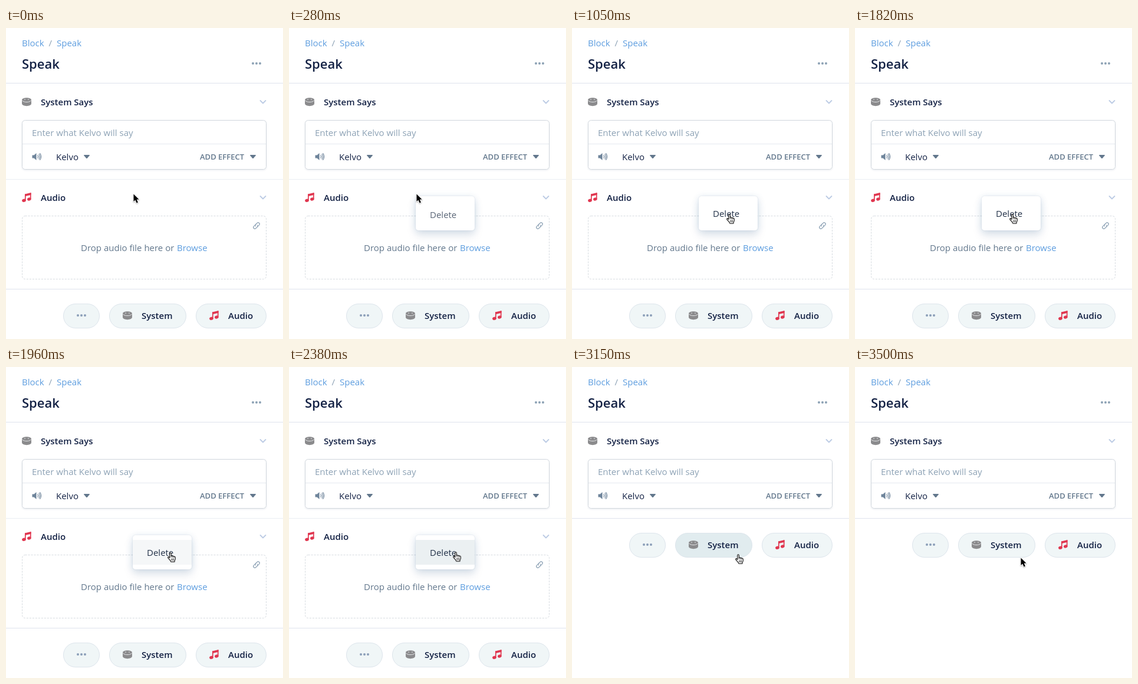
Animation of 470 by 527 pixels, one loop 3780 ms. Source, as an HTML page with a canvas:

```html
<!DOCTYPE html>
<html lang="en">
<head>
<meta charset="utf-8">
<title>Speak block</title>
<style>
html, body { margin: 0; width: 100%; height: 100%; overflow: hidden; background: #fff; }
canvas { display: block; width: 470px; height: 527px; }
</style>
</head>
<body>
<canvas id="stage" width="470" height="527"></canvas>
<script>
const ctx = document.getElementById('stage').getContext('2d');
const LOOP = 3780, STEP = 70;
const INK = '#132144', SLATE = '#62778c', MUTED = '#8da2b5', BLUE = '#5d9ddf', LINE = '#dfe3ed', RED = '#e0364f';

// time, x, y of the pointer tip
const PATH = [
  [490, 216, 281], [560, 222, 287], [630, 231, 296], [700, 241, 305], [770, 250, 310],
  [840, 257, 313], [910, 262, 314], [980, 265, 315], [1050, 268, 315],
  [1820, 268, 315], [1890, 274, 315], [1960, 280, 314], [2030, 284, 313],
  [3080, 284, 313], [3150, 283, 317], [3220, 282, 321], [3290, 281, 323]
];

const clamp = v => Math.max(0, Math.min(1, v));
const ramp = (t, a, b) => clamp((t - a) / (b - a));

function pointerAt(t) {
  let i = 0;
  while (i < PATH.length - 1 && PATH[i + 1][0] <= t) i++;
  const [t0, x0, y0] = PATH[i], [t1, x1, y1] = PATH[i + 1] || [t0 + 1, x0, y0];
  const k = ramp(t, t0, t1);
  return [x0 + (x1 - x0) * k, y0 + (y1 - y0) * k];
}

function text(str, x, y, color, weight = 400, size = 15) {
  ctx.font = `${weight} ${size}px "Open Sans", "Noto Sans", sans-serif`;
  ctx.fillStyle = color;
  ctx.fillText(str, x, y);
}

function rule(y, color = LINE) {
  ctx.fillStyle = color;
  ctx.fillRect(0, y, 470, 1);
}

function box(x, y, w, h, r) {
  ctx.beginPath();
  ctx.roundRect(x, y, w, h, r);
}

function path(d, color, width) {
  const p = new Path2D(d);
  if (width) {
    ctx.strokeStyle = color;
    ctx.lineWidth = width;
    ctx.stroke(p);
  } else {
    ctx.fillStyle = color;
    ctx.fill(p);
  }
}

function at(x, y, draw) {
  ctx.save();
  ctx.translate(x, y);
  ctx.lineCap = ctx.lineJoin = 'round';
  draw();
  ctx.restore();
}

function dots(x, y, color = MUTED) {
  ctx.fillStyle = color;
  for (const dx of [-6, 0, 6]) {
    ctx.beginPath();
    ctx.arc(x + dx, y, 2, 0, 7);
    ctx.fill();
  }
}

const disc = (x, y) => at(x, y, () => {
  path('M-8 -3C-8 -8 8 -8 8 -3V3C8 8.5 -8 8.5 -8 3Z', '#8b8b8d');
  path('M-7.6 -2.2C-6 1.6 6 1.6 7.6 -2.2', '#e4e6e8', 1);
  path('M-3.5 -3.8H-2.5M2.5 -3.8H3.5', '#d5d7d9', 1.2);
});

const note = (x, y) => at(x, y, () => {
  path('M-3 -5.6L7.5 -8V-4.2L-3 -1.8Z', RED);
  path('M-2.2 -5V5M6.7 -7V2.6', RED, 1.7);
  ctx.fillStyle = RED;
  for (const [dx, dy] of [[-4.6, 5.3], [4.3, 3]]) {
    ctx.beginPath();
    ctx.ellipse(dx, dy, 3.3, 2.6, -0.2, 0, 7);
    ctx.fill();
  }
});

const chevron = y => at(436, y, () => path('M-4.5 -2L0 2.5L4.5 -2', '#bccbe4', 1.8));

const caret = (x, y) => at(x, y, () =>
  path('M-4 -3H4Q5.6 -3 4.6 -1.8L1 2.4Q0 3.5 -1 2.4L-4.6 -1.8Q-5.6 -3 -4 -3Z', SLATE));

const speaker = (x, y) => at(x, y, () => {
  path('M-7.5 -2.5H-4.5L-0.5 -6V6L-4.5 2.5H-7.5Z', '#6e849a');
  path('M2 -2.2Q3.6 0 2 2.2M4 -4Q7 0 4 4M5.6 -5.4Q9.6 0 5.6 5.4', '#6e849a', 1.2);
});

const link = (x, y) => at(x, y, () => {
  ctx.rotate(-Math.PI / 4);
  path('M1.2 -2.4H-4A2.4 2.4 0 0 0 -4 2.4H-0.5A2.4 2.4 0 0 0 1.8 0.4', MUTED, 1.2);
  path('M-1.2 2.4M-1.8 -0.4A2.4 2.4 0 0 1 0.5 -2.4H4A2.4 2.4 0 0 1 4 2.4H-0.6', MUTED, 1.2);
});

function pill(x, y, w, hover = 0) {
  const mix = (a, b) => Math.round(a + (b - a) * hover);
  box(x + 0.5, y + 0.5, w - 1, 41, 20.5);
  ctx.fillStyle = `rgb(${mix(240, 225)},${mix(246, 236)},${mix(247, 239)})`;
  ctx.fill();
  ctx.strokeStyle = '#dde5ec';
  ctx.lineWidth = 1;
  ctx.stroke();
}

function header() {
  text('Block', 27, 31, BLUE);
  text('/', 72.5, 31, MUTED);
  text('Speak', 86, 31, BLUE);
  text('Speak', 27, 69, INK, 600, 22);
  dots(425, 60);
  rule(93);
}

function systemPart() {
  disc(35, 125);
  text('System Says', 59, 131, INK, 600);
  chevron(125);
  ctx.save();
  ctx.shadowColor = 'rgba(17,49,96,.10)';
  ctx.shadowBlur = 3;
  ctx.shadowOffsetY = 1;
  box(27, 156, 415, 84, 5);
  ctx.fillStyle = '#fff';
  ctx.fill();
  ctx.restore();
  box(27.5, 156.5, 414, 83, 5);
  ctx.strokeStyle = '#d2d8de';
  ctx.lineWidth = 1;
  ctx.stroke();
  ctx.fillStyle = '#e5e9ef';
  ctx.fillRect(28, 196, 413, 1);
  text('Enter what Kelvo will say', 44, 183, MUTED);
  speaker(52, 218);
  text('Kelvo', 85, 224, INK);
  caret(137, 218);
  text('ADD EFFECT', 329, 223, SLATE, 600, 13);
  caret(419, 218);
}

function audioPart() {
  rule(256, '#eaeef3');
  note(35, 287);
  text('Audio', 59, 293, INK, 600);
  chevron(287);
  ctx.save();
  ctx.setLineDash([3, 2]);
  box(27.5, 318.5, 414, 107, 5);
  ctx.strokeStyle = '#d6dbe0';
  ctx.lineWidth = 1;
  ctx.stroke();
  ctx.restore();
  link(425, 335);
  text('Drop audio file here or ', 127, 378, SLATE);
  text('Browse', 290, 378, BLUE);
}

function footer(y, hover) {
  rule(y);
  const top = y + 25, mid = y + 45;
  pill(97, top, 62);
  dots(128, mid, '#8c9fb9');
  pill(175, top, 131, hover);
  disc(206, mid);
  text('System', 230, mid + 6, INK, 600);
  pill(322, top, 120);
  note(353, mid);
  text('Audio', 377, mid + 6, INK, 600);
}

function menu(t) {
  ctx.save();
  ctx.globalAlpha = ramp(t, 0, 280);
  ctx.fillStyle = '#fff';
  box(215, 285, 100, 58, 5);
  for (const [blur, dy, color] of [[16, 8, 'rgba(17,49,96,.13)'], [12, 1, 'rgba(90,150,200,.16)'], [2, 0, 'rgba(17,49,96,.14)']]) {
    ctx.shadowColor = color;
    ctx.shadowBlur = blur;
    ctx.shadowOffsetY = dy;
    ctx.fill();
  }
  ctx.shadowColor = 'transparent';
  ctx.globalAlpha = ramp(t, 1820, 2100);
  ctx.fillStyle = '#ebf0f2';
  ctx.fillRect(215, 293, 100, 42);
  const shown = ramp(t, 70, 350);
  ctx.globalAlpha = shown;
  text('Delete', 239, 320 + Math.round(8 * (1 - shown)), '#223148');
  ctx.restore();
}

const arrow = (x, y) => at(x, y, () => {
  const d = 'M0.5 0.5V13L3.4 10.4L5.6 15.4L7.9 14.4L5.8 9.6H9.6Z';
  ctx.shadowColor = 'rgba(0,0,0,.3)';
  ctx.shadowBlur = 2;
  ctx.shadowOffsetY = 1;
  path(d, '#fff', 2);
  ctx.shadowColor = 'transparent';
  path(d, '#000');
});

const hand = (x, y) => at(x - 6, y, () => {
  const d = 'M3.8 9.4V2.2Q3.8 0.8 5 0.8Q6.3 0.8 6.3 2.2V6.2Q7.4 5 8.7 6.6Q10.1 5.7 11 7.2Q13.3 6.7 13.3 8.8V11Q13.2 12.7 12 14V16H5.8Q5.4 14.2 3.6 12.4L1 9.6Q0.2 8 1.6 7.6Q2.6 7.6 3.8 9.4Z';
  ctx.shadowColor = 'rgba(0,0,0,.25)';
  ctx.shadowBlur = 2;
  ctx.shadowOffsetY = 1;
  path(d, '#fff');
  ctx.shadowColor = 'transparent';
  path(d, '#111', 1.1);
  path('M6.3 6V8.4M8.7 6.8V8.8M11 7.4V9.2M6.8 10.8V13.6M8.7 10.8V13.6M10.6 10.8V13.6', '#111', 0.8);
});

function draw(t) {
  ctx.fillStyle = '#fff';
  ctx.fillRect(0, 0, 470, 527);
  header();
  systemPart();
  const deleted = t >= 2450;
  if (deleted) {
    footer(256, 1 - ramp(t, 3150, 3500));
  } else {
    audioPart();
    footer(442, 0);
    if (t >= 70) menu(t);
  }
  const pointer = t >= 770 && t < 3220 ? hand : arrow;
  pointer(...pointerAt(t));
}

function frame() {
  const t = performance.now() % LOOP;
  draw(Math.floor(t / STEP) * STEP);
  requestAnimationFrame(frame);
}
frame();
</script>
</body>
</html>
```
